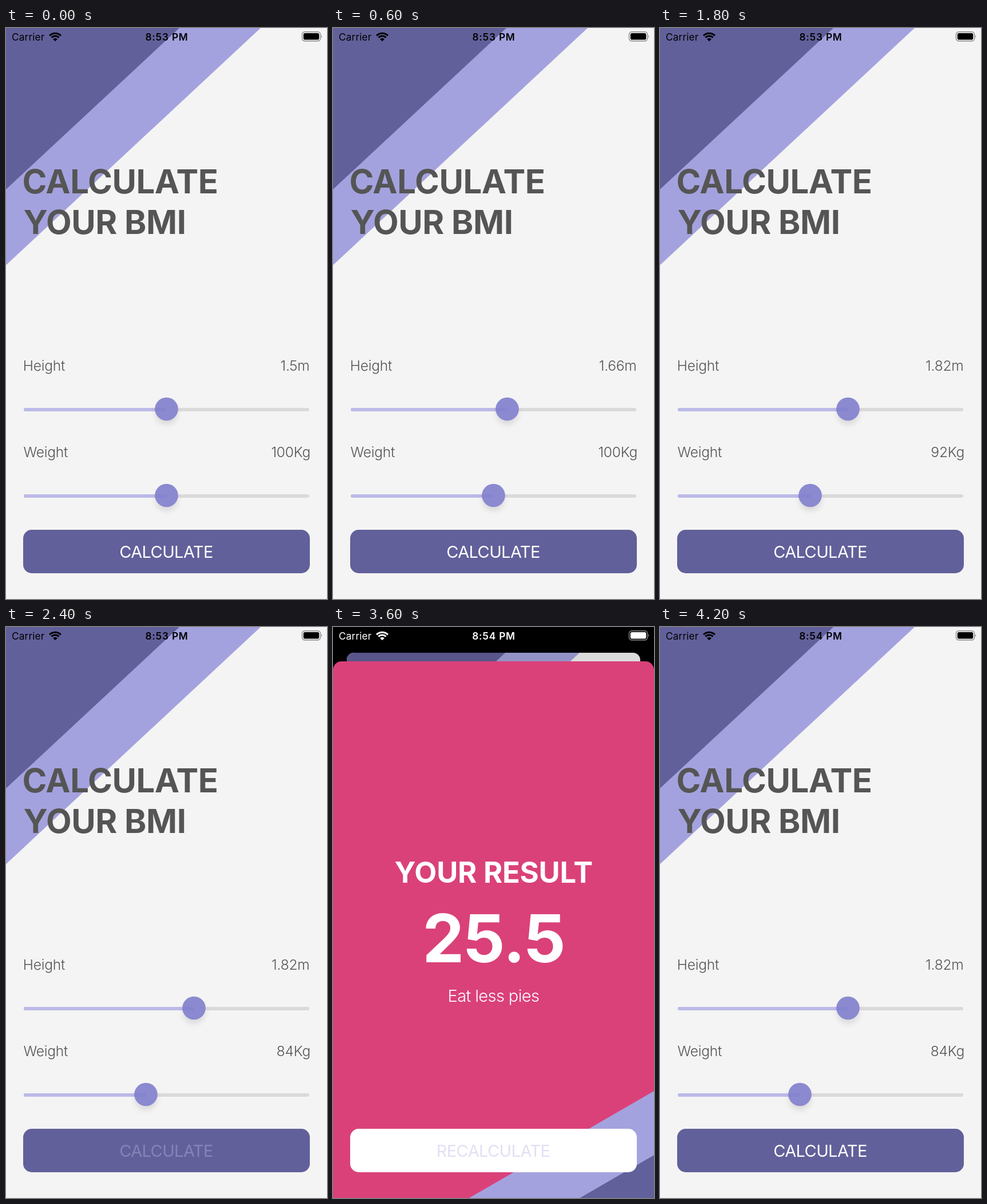
Recreate the animation shown at these times as an HTML page. Size 561 by 998 pixels, loop 4.8 s.

```html
<!DOCTYPE html>
<html lang="en">
<head>
<meta charset="utf-8">
<title>BMI calculator</title>
<style>
  html, body { margin: 0; width: 100%; height: 100%; overflow: hidden; background: #000; }
  svg { display: block; }
  text { font-family: Inter, Roboto, sans-serif; font-optical-sizing: none; }
  .status { font-size: 17.3px; letter-spacing: .1px; }
  .clock { font-weight: 600; letter-spacing: .8px; text-anchor: middle; }
  .title { font-size: 58px; font-weight: 700; letter-spacing: -.45px; fill: #555; }
  .label { font-size: 24.6px; font-weight: 300; letter-spacing: -.25px; fill: #555; }
  .end { text-anchor: end; }
  .button { font-size: 29px; letter-spacing: -.6px; text-anchor: middle; }
  .heading { font-size: 50.7px; font-weight: 700; letter-spacing: -.2px; text-anchor: middle; }
  .score { font-size: 116px; font-weight: 700; letter-spacing: -.8px; text-anchor: middle; }
  .advice { font-size: 29px; font-weight: 300; letter-spacing: -.6px; text-anchor: middle; }
</style>
</head>
<body>
<svg width="561" height="998" viewBox="0 0 561 998">
  <defs>
    <clipPath id="pageClip"><rect id="pageShape" width="561" height="998"/></clipPath>
    <clipPath id="sheetClip"><rect y="60" width="561" height="1000" rx="15"/></clipPath>
    <filter id="soft" x="-50%" y="-50%" width="200%" height="200%"><feGaussianBlur stdDeviation="5.5"/></filter>
    <g id="track">
      <rect x="31" y="-2" width="499" height="6" rx="3" fill="#dadada"/>
    </g>
    <g id="thumb">
      <circle cy="8" r="19" fill="#000" opacity=".11" filter="url(#soft)"/>
      <circle r="20.3" fill="#8b89d0"/>
      <rect x="-20" y="-2" width="20" height="6" fill="#8684ce"/>
    </g>
  </defs>
  <rect width="561" height="998"/>

  <g id="page">
    <g clip-path="url(#pageClip)">
      <rect width="561" height="998" fill="#f4f4f4"/>
      <path d="M0 0H445L0 414.5Z" fill="#a4a2de"/>
      <path d="M0 0H303L0 282Z" fill="#62609a"/>
      <text class="title" x="28.5" y="289">CALCULATE</text>
      <text class="title" x="30.5" y="360">YOUR BMI</text>

      <text class="label" x="29.8" y="599">Height</text>
      <text class="label end" id="height" x="530.5" y="599"></text>
      <g transform="translate(0 666)">
        <use href="#track"/>
        <rect id="heightBar" x="31" y="-2" height="6" rx="3" fill="#bcbae8"/>
        <use id="heightThumb" href="#thumb"/>
      </g>

      <text class="label" x="30.5" y="750">Weight</text>
      <text class="label end" id="weight" x="532" y="750"></text>
      <g transform="translate(0 817)">
        <use href="#track"/>
        <rect id="weightBar" x="31" y="-2" height="6" rx="3" fill="#bcbae8"/>
        <use id="weightThumb" href="#thumb"/>
      </g>

      <rect x="30" y="877" width="501" height="76" rx="15" fill="#62609a"/>
      <text class="button" id="calculate" x="280" y="925.5">CALCULATE</text>
      <rect id="dim" width="561" height="998"/>
    </g>
  </g>

  <g id="sheet">
    <g clip-path="url(#sheetClip)">
      <rect y="60" width="561" height="960" fill="#da4179"/>
      <path d="M561 811V1020H200Z" fill="#a4a2de"/>
      <path d="M561 923V1023H388Z" fill="#62609a"/>
    </g>
    <g fill="#fff">
      <text class="heading" x="280.8" y="446.5">YOUR RESULT</text>
      <text class="score" x="281" y="585.5">25.5</text>
      <text class="advice" x="280.5" y="655">Eat less pies</text>
      <rect x="30" y="877" width="501" height="76" rx="15"/>
    </g>
    <text class="button" id="recalculate" x="280" y="925.5">RECALCULATE</text>
  </g>

  <g id="status">
    <text class="status" x="10" y="22">Carrier</text>
    <text class="status clock" id="clock" x="281" y="22"></text>
    <g transform="translate(86 23.3)">
      <path d="M0 0L-3.9 -3.9A5.5 5.5 0 0 1 3.9 -3.9Z"/>
      <path d="M-6.5 -6.5A9.2 9.2 0 0 1 6.5 -6.5M-9.9 -9.9A14 14 0 0 1 9.9 -9.9" fill="none" stroke="currentColor" stroke-width="3"/>
    </g>
    <rect x="517.5" y="6.8" width="32" height="16" rx="4.5" fill="none" stroke="#8a8a8a" stroke-width="1.4"/>
    <rect x="519.8" y="9" width="27.4" height="11.6" rx="2.8"/>
    <path d="M551 12.3Q553.4 14.8 551 17.3Z" fill="#8a8a8a"/>
  </g>
</svg>
<script>
const STEP = 600;
const $ = id => document.getElementById(id);
const set = (id, attrs) => {
  for (const key in attrs) $(id).setAttribute(key, attrs[key]);
};

const start = { height: 1.5, weight: 100, clock: '8:53 PM', ink: '#000' };
const chosen = { ...start, height: 1.82, weight: 84 };
const poses = [
  start,
  { ...start, height: 1.66 },
  { ...start, height: 1.82 },
  { ...start, height: 1.82, weight: 92 },
  { ...chosen, pressed: true },
  { ...chosen, ink: '#eee', sheet: 18.5, card: [23.3, 44, .917], dim: .12 },
  { ...chosen, ink: '#fff', sheet: 0, card: [24, 45, .9144], dim: .1, sheetPressed: true, clock: '8:54 PM' },
  { ...chosen, clock: '8:54 PM' }
];

function slide(name, value, max, label) {
  const x = 280.5 + (value / max - .5) * 450;
  set(name + 'Bar', { width: x - 31 });
  set(name + 'Thumb', { x });
  $(name).textContent = label;
}

function draw(p) {
  const [x, y, scale] = p.card || [0, 0, 1];
  slide('height', p.height, 3, p.height + 'm');
  slide('weight', p.weight, 200, p.weight + 'Kg');
  set('page', { transform: `translate(${x} ${y}) scale(${scale})` });
  set('pageShape', { rx: p.card ? 14 : 0 });
  set('dim', { opacity: p.dim || 0 });
  set('calculate', { fill: p.pressed ? '#8683b9' : '#fff' });
  set('sheet', {
    visibility: p.card ? 'visible' : 'hidden',
    transform: `translate(0 ${p.sheet || 0})`
  });
  set('recalculate', { fill: p.sheetPressed ? '#e1e0f5' : '#7472d2' });
  set('status', { fill: p.ink, color: p.ink });
  $('clock').textContent = p.clock;
}

let origin, shown;
function tick(now) {
  origin ??= now;
  const pose = poses[Math.floor((now - origin) / STEP) % poses.length];
  if (pose !== shown) draw(shown = pose);
  requestAnimationFrame(tick);
}
draw(start);
requestAnimationFrame(tick);
</script>
</body>
</html>
```
